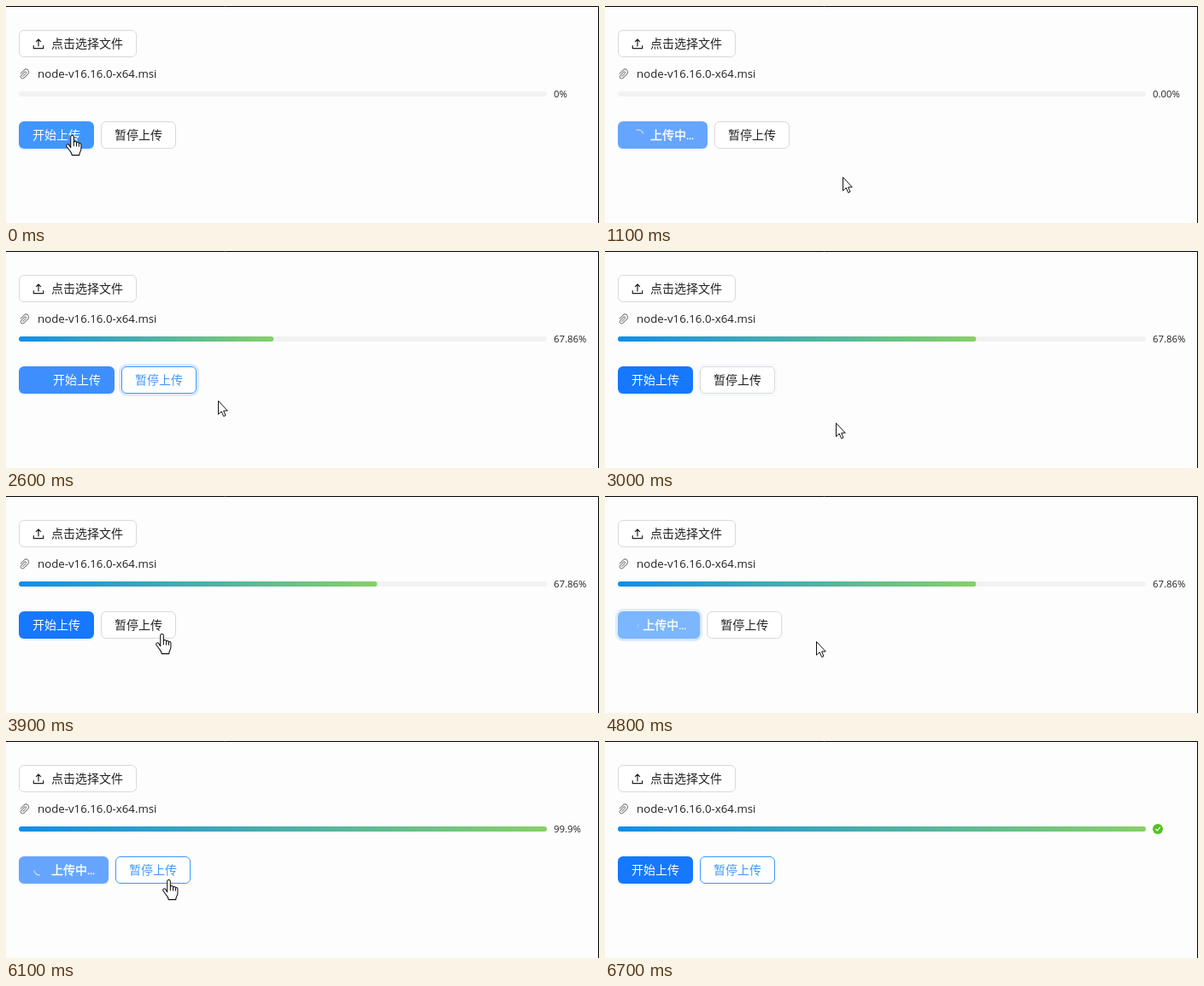
An HTML page that plays this animation: 694x254 px, repeating every 7.5 s.

```html
<!DOCTYPE html>
<html lang="zh">
<head>
<meta charset="utf-8">
<title>上传</title>
<style>
  html, body { margin: 0; width: 100%; height: 100%; overflow: hidden; background: #fdfdfd; }
  svg { display: block; }
  text { font-family: "Open Sans", "Noto Sans CJK SC", "Noto Sans CJK", sans-serif; font-size: 14px; fill: #222; }
  .line { fill: none; stroke-linecap: round; stroke-linejoin: round; }
  .halo { fill: none; stroke: #1677ff; stroke-width: 3; }
  #start text { fill: #fff; }
</style>
</head>
<body>
<svg width="694" height="254" viewBox="0 0 694 254">
  <defs>
    <linearGradient id="grad">
      <stop offset="0" stop-color="#108ee9"/>
      <stop offset="1" stop-color="#87d068"/>
    </linearGradient>
  </defs>
  <rect width="694" height="254" fill="#fdfdfd"/>
  <path d="M0 .5H693.5V254" fill="none" stroke="#000"/>

  <rect x="15.5" y="28.5" width="137" height="31" rx="5.5" fill="#fff" stroke="#d9d9d9"/>
  <path class="line" stroke="#222" stroke-width="1.2" d="M38 47V39M35.4 41.6L38 39l2.6 2.6M32.3 46.5v3.2h11.4v-3.2"/>
  <text x="53" y="49">点击选择文件</text>

  <g transform="translate(14 71.6) scale(.0155)">
    <path class="line" stroke="#808080" stroke-width="66"
      d="M200 482L462 221a207 207 0 0 1 293 293L445 824a140 140 0 0 1-198-198L510 362a71 71 0 0 1 100 100L372 700"/>
  </g>
  <text x="37" y="84" style="font-size:13.25px">node-v16.16.0-x64.msi</text>

  <rect x="15" y="100" width="618" height="6" rx="3" fill="#f2f2f2"/>
  <rect id="bar" x="15" y="100" height="6" rx="3" fill="url(#grad)"/>
  <text id="pct" x="641" y="107" style="font-size:11.33px"></text>
  <g id="done">
    <circle cx="647" cy="103" r="6" fill="#52c41a"/>
    <path class="line" stroke="#fff" stroke-width="1.2" d="M644.6 103.2l1.8 1.8 3-3.8"/>
  </g>

  <rect id="startHalo" class="halo" x="13.5" y="133.5" height="35" rx="7.5"/>
  <g id="start">
    <rect id="startShade" x="15" y="137" height="32" rx="6" fill="#0591ff" opacity=".1"/>
    <rect id="startBox" x="15" y="135" height="32" rx="6"/>
    <path id="spin" class="line" stroke="#fff" d="M0-6A6 6 0 0 1 6 0"/>
    <text id="idle" y="156">开始上传</text>
    <text id="busy" y="156" stroke="#fff" stroke-width=".35">上传中<tspan font-size="11.5">...</tspan></text>
  </g>
  <g id="pause">
    <rect id="pauseHalo" class="halo" x="-1.5" y="133.5" width="91" height="35" rx="7.5"/>
    <rect id="pauseBox" x=".5" y="135.5" width="87" height="31" rx="5.5" fill="#fff"/>
    <text id="pauseText" x="16" y="156">暂停上传</text>
  </g>

  <g id="pointer">
    <path id="arrow" fill="#fff" stroke="#111" d="M.5-.5V15.2L4.2 11.8 6.7 17.5 9 16.5 6.6 11H11.3Z"/>
    <g id="hand" class="line" stroke="#111" transform="translate(0 -1) scale(1.06)">
      <path fill="#fff" d="M-1.2 14V2.2a1.7 1.7 0 0 1 3.4 0V8a1.6 1.6 0 0 1 3 .5 1.6 1.6 0 0 1 2.7.8 1.5 1.5 0 0 1 2.4 1.2V15c0 3-2 4-2 7.3H.3C.3 20-1.7 18-3.2 16L-5.9 12.3a1.6 1.6 0 0 1 2.5-1.8Z"/>
      <path d="M2.2 8v4M5.2 8.8v3.4M7.9 9.8v2.6"/>
    </g>
  </g>
</svg>
<script>
const LOOP = 7500, STEP = 100, CHUNKS = 28, DONE = 6400;
const BLUE = [22, 119, 255], SKY = [64, 150, 255], INK = [34, 34, 34], GREY = [217, 217, 217];

// Each run: click, first and last chunk sent, end of the busy state.
const runs = [
  { click: 150, first: 1150, last: 2500, end: 2500, chunks: 19 },
  { click: 4620, first: 4850, last: 5570, end: DONE, chunks: 9 }
];
// Pointer moves: leave, arrive, x, y.
const home = [77, 152];
const moves = [
  [300, 800, 278, 201], [1500, 2200, 182, 155], [2450, 2600, 248, 176], [2600, 2900, 270, 202],
  [3500, 3900, 182, 162], [3900, 4200, 77, 153], [4680, 4800, 247, 171], [5500, 5700, 190, 163]
];

const el = {};
document.querySelectorAll('[id]').forEach(n => el[n.id] = n);

const ramp = (t, from, span) => Math.max(0, Math.min(1, (t - from) / span));
const smooth = u => u * u * (3 - 2 * u);
const lerp = (a, b, u) => a + (b - a) * u;
const mix = (a, b, u) => 'rgb(' + a.map((v, i) => Math.round(lerp(v, b[i], u))) + ')';
const sum = (list, f) => list.reduce((s, v) => s + f(v), 0);
const set = (node, attrs) => { for (const k in attrs) node.setAttribute(k, attrs[k]); };
const show = (node, on) => set(node, { visibility: on ? 'visible' : 'hidden' });

const sent = (t, r) => ramp(t, r.first, r.last - r.first);

// The bar lags behind the counter, then catches up after the last chunk.
function barShare(t) {
  const lag = .61;
  const chunks = sum(runs, r =>
    r.chunks * (lag * sent(t, r) + (1 - lag) * smooth(ramp(t, r.last, 300))));
  return chunks / CHUNKS;
}

function percent(t) {
  if (t < 1000) return '0%';
  const chunks = sum(runs, r => Math.floor(r.chunks * sent(t, r)));
  return chunks < CHUNKS ? (chunks / CHUNKS * 100).toFixed(2) + '%' : '99.9%';
}

function layout(t) {
  const run = runs.filter(r => t >= r.click).pop();
  let busy = false, icon = 0, opacity = 1;
  if (run) {
    busy = t < run.end;
    icon = busy ? 22 * ramp(t, run.click, 300) : 24 * (1 - ramp(t, run.end + 100, 200));
    opacity = busy ? lerp(1, .65, ramp(t, run.click, 200)) : lerp(.65, 1, ramp(t, run.end, 200));
  }
  const width = 32 + icon + (busy ? 51 : 56);
  const angle = run ? (t - run.click) * .36 : 0;
  return { busy, icon, opacity, width, angle, pauseX: 23 + width };
}

function pointerAt(t) {
  let [x, y] = home;
  for (const [leave, arrive, toX, toY] of moves) {
    const u = smooth(ramp(t, leave, arrive - leave));
    x = lerp(x, toX, u);
    y = lerp(y, toY, u);
  }
  return [x, y];
}

function over(t) {
  const { width, pauseX } = layout(t), [x, y] = pointerAt(t);
  const hit = (left, w) => x >= left && x <= left + w && y >= 135 && y <= 167;
  return { start: hit(15, width), pause: hit(pauseX, 88) };
}

// Colours trail the pointer by a short transition.
const hover = (t, name) => sum([100, 200], d => over(Math.max(0, t - d))[name] / 2);
const halo = (t, clicks) => sum(clicks, c => t < c ? 0 : .17 * (1 - ramp(t, c, 600)));

function draw(t) {
  const { busy, icon, opacity, width, angle, pauseX } = layout(t);
  const finished = t >= DONE;

  set(el.bar, { width: 618 * barShare(t) });
  el.pct.textContent = finished ? '' : percent(t);
  show(el.done, finished);

  set(el.startHalo, { width: width + 3, opacity: halo(t, runs.map(r => r.click)) });
  set(el.start, { opacity });
  set(el.startShade, { width });
  set(el.startBox, { width, fill: mix(BLUE, SKY, hover(t, 'start')) });
  show(el.idle, !busy);
  show(el.busy, busy);
  set(el.idle, { x: 31 + icon });
  set(el.busy, { x: 31 + icon });
  show(el.spin, busy);
  const grow = icon / 22;
  set(el.spin, {
    opacity: .8 * grow,
    transform: `translate(${31 + icon * .36} 151) rotate(${angle}) scale(${grow})`
  });

  const h = hover(t, 'pause');
  set(el.pause, { transform: `translate(${pauseX} 0)` });
  set(el.pauseHalo, { opacity: halo(t, [runs[0].end]) });
  set(el.pauseBox, { stroke: mix(GREY, SKY, h) });
  el.pauseText.style.fill = mix(INK, SKY, h);

  const [x, y] = pointerAt(t), at = over(t);
  const hand = at.pause || (at.start && !busy);
  const visible = t < 6700;
  set(el.pointer, { transform: `translate(${Math.round(x)} ${Math.round(y)})` });
  show(el.arrow, visible && !hand);
  show(el.hand, visible && hand);
}

const begin = performance.now();
function tick() {
  const t = (performance.now() - begin) % LOOP;
  draw(Math.floor(t / STEP) * STEP);
  requestAnimationFrame(tick);
}
tick();
</script>
</body>
</html>
```
